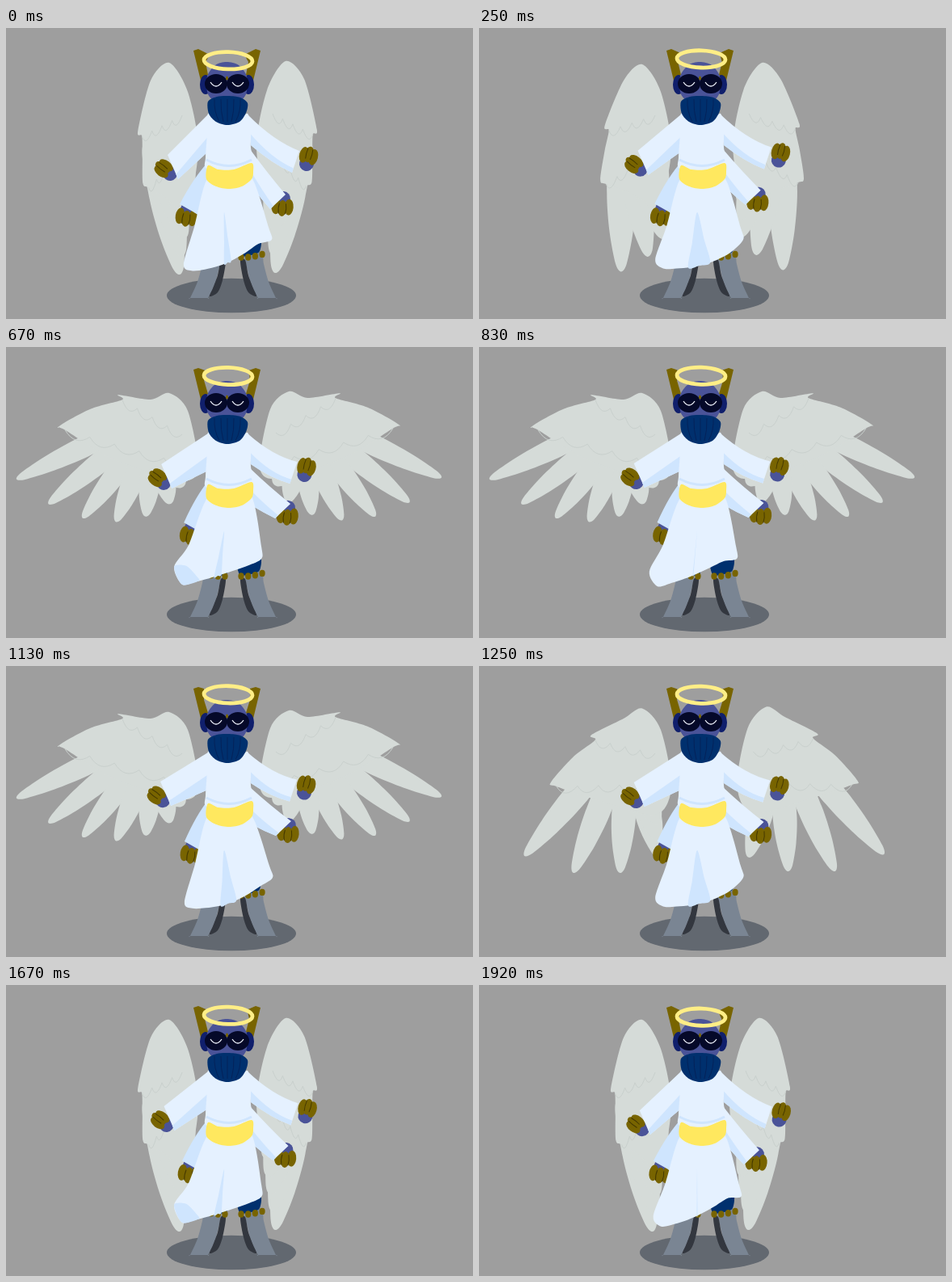
Recreate the animation shown at these times as an HTML page with a canvas. Size 578 by 360 pixels, loop 2 s.

```html
<!DOCTYPE html>
<html lang="en">
<head>
<meta charset="utf-8">
<title>Winged figure</title>
<style>
  html, body { margin: 0; width: 100%; height: 100%; overflow: hidden; background: #9e9e9e; }
  canvas { display: block; width: 578px; height: 360px; }
</style>
</head>
<body>
<canvas id="stage" width="578" height="360"></canvas>
<script>
const g = document.getElementById('stage').getContext('2d');
const LOOP = 2000;
const { sin, cos, PI, min, max, abs, floor } = Math;
const C = {
  back: '#9e9e9e', shadow: '#626870', wing: '#d5dbd8', wingLine: '#c9d0cd',
  robe: '#e5f1ff', fold: '#cfe5fe', belt: '#ffe85f', halo: '#ffee86',
  gold: '#786400', goldLine: '#453900', skin: '#4a5398', fur: '#00306e',
  furLine: '#04225a', cup: '#101f6c', lens: '#050929', leg: '#7a8593', hoof: '#33373f'
};

const pts = s => s.split(' ').map(p => p.split(',').map(Number));
const mix = (a, b, k) => a + (b - a) * k;
const between = (p, q, k, dy = 0) => [mix(p[0], q[0], k), mix(p[1], q[1], k) + dy];

// Closed smooth curve through the points.
function blob(p, fill) {
  const n = p.length, at = i => p[(i + n) % n];
  g.beginPath();
  g.moveTo(...p[0]);
  for (let i = 0; i < n; i++) {
    const [a, b, c, d] = [at(i - 1), at(i), at(i + 1), at(i + 2)];
    g.bezierCurveTo(b[0] + (c[0] - a[0]) / 7, b[1] + (c[1] - a[1]) / 7,
                    c[0] - (d[0] - b[0]) / 7, c[1] - (d[1] - b[1]) / 7, c[0], c[1]);
  }
  g.fillStyle = fill;
  g.fill();
}

function oval(x, y, rx, ry, fill) {
  g.beginPath();
  g.ellipse(x, y, rx, ry, 0, 0, 7);
  g.fillStyle = fill;
  g.fill();
}

function curve(a, control, b, color, width = 1) {
  g.beginPath();
  g.moveTo(...a);
  g.quadraticCurveTo(...control, ...b);
  g.strokeStyle = color;
  g.lineWidth = width;
  g.stroke();
}

function mirrored(cx, dy, draw) {
  g.save();
  g.translate(2 * cx, dy);
  g.scale(-1, 1);
  draw();
  g.restore();
}

// Wings: everything fans out around the shoulder joint, angles in degrees from straight down.
const spreads = [0, .15, .52, .68, 1];
const polar = (deg, r, dx = 0) =>
  [215 + dx - r * sin(deg * PI / 180), 90 + r * cos(deg * PI / 180)];

function feather(from, to, w) {
  const dx = to[0] - from[0], dy = to[1] - from[1], len = Math.hypot(dx, dy);
  const at = (k, side) => [from[0] + dx * k - dy / len * w * side, from[1] + dy * k + dx / len * w * side];
  blob([at(0, -.8), at(.4, -1), at(.7, -.8), at(.94, -.38), at(1, 0),
        at(.94, .38), at(.7, .8), at(.4, 1), at(0, .8)], C.wing);
}

function scallops(a, b, n) {
  for (let i = 0; i < n; i++)
    curve(between(a, b, i / n), between(a, b, (i + .4) / n, 17), between(a, b, (i + 1) / n), C.wingLine);
}

function wing(s) {
  const gap = 17 * sin(2.3 * s ** .8);
  for (let i = 0; i < 7; i++) {
    const deg = max(-3, 70 * s - gap * i), shift = 3 * i * (1 - s) ** 2;
    feather(polar(deg + mix(30, 14, s), 62, shift), polar(deg, 215 - 22 * i, shift), mix(19, 13, s));
  }
  const upper = polar(54 + 58 * s, 64 + 18 * s);
  const lower = polar(24 + 63 * s, 112 + 37 * s);
  const tuck = [upper[0] + 5, upper[1] + 6];
  const under = [lower[0] + 7, lower[1] + 5];
  blob([[238, 150], [225, 79], [202, 43 + 14 * s], [179, 65], upper, tuck,
        between(tuck, lower, .5, -5), lower, under,
        polar(9 + 50 * s, 120 - 25 * s), [223 - 8 * s, 225 - 60 * s]], C.wing);
  scallops(tuck, [218, 108], 4);
  scallops(under, [226, 146], 5);
}

// Skirt: a wave runs along the hem while the whole cloth sways.
function skirt(a) {
  const sway = cos(a - .6);
  const left = [214.5 + 6.5 * sway, 282 + 11 * cos(a - .4)];
  const right = [323 + 7 * sway, 262];
  const hem = u => [mix(left[0], right[0], u), 297 - 35 * u * u + (3 + 6 * u) * sin(a + 1.6 - 2.6 * u)];
  const edge = [.09, .24, .4, .55, .7, .85].map(hem);
  blob([[304, 185], [276, 180], [249, 187], [230 + 4 * sway, 245], left,
        ...edge, right, [321 + 5 * sway, 247]], C.robe);

  const w = .065 * (1 + sin(a - .4));
  blob([[270, 228], between([270, 228], hem(.5 + w), .55), hem(.5 + w), hem(.5),
        hem(.5 - w), between([270, 228], hem(.5 - w), .55)], C.fold);
  if (cos(a - .2) < -.5)
    blob([left, [left[0] + 15, left[1] - 1], [left[0] + 28, left[1] + 12], hem(.28), hem(.09)], C.fold);
}

// Sleeve: shoulder top and bottom, cuff top and bottom, and how far the cloth hangs.
function cloth(a, b, c, d, sag, fill) {
  g.beginPath();
  g.moveTo(...a);
  g.quadraticCurveTo(...between(a, b, .5, 2 * sag), ...b);
  g.lineTo(...c);
  g.quadraticCurveTo(...between(c, d, .5, sag), ...d);
  g.fillStyle = fill;
  g.fill();
}

function hand(x, y, deg, spread) {
  g.save();
  g.translate(x, y);
  g.rotate(deg * PI / 180);
  oval(0, 0, 9, 9, C.skin);
  for (const i of [-1, 1, 0]) oval(12 - abs(i) * 2, i * spread, 10, 5.6, C.gold);
  for (const i of [-1, 1]) curve([6, i * spread / 2], [12, i * spread * .7], [19, i * spread / 2], C.goldLine);
  g.restore();
}

const arms = {
  lowLeft: { sleeve: '251,165 215,218 238,231 254,190', sag: -4, move: [6, -1], wrist: [225, 224], aim: 100, spread: 8 },
  lowRight: { sleeve: '302,150 346,206 327,224 304,196', sag: 1, move: [7, -14], wrist: [343, 211], aim: 95, spread: 8 },
  left: { sleeve: '250,107 200,157 213,187 250,153', sag: 0, move: [-9, -14], wrist: [203, 180], aim: -142, spread: 5 },
  right: { sleeve: '299,107 363,152 354,179 303,145', sag: 5, move: [-3, -11.5], wrist: [372, 168], aim: -75, spread: 6 }
};

function drawArm({ sleeve, sag, move, wrist, aim, spread }, swing, fill = C.robe) {
  const shift = ([x, y]) => [x + move[0] * swing, y + move[1] * swing];
  const [a, b, c, d] = pts(sleeve);
  const top = shift(b), low = shift(c);
  hand(...shift(wrist), aim, spread);
  cloth(a, top, low, d, sag, fill);
  cloth(between(a, d, .6), between(top, low, .8), low, d, sag, C.fold);
}

const legShape = pts('296,278 316,278 319,292 325,314 334,334 334,334 312,334 312,334 304,318 299,300');
const hoofShape = pts('290,288 296,287 300,306 306,322 310,332 300,327 294,312');

function leg() {
  blob(legShape, C.leg);
  blob(hoofShape, C.hoof);
  blob(pts('287,258 314,258 314,276 303,281 289,281'), C.fur);
  for (let i = 0; i < 4; i++) oval(291 + 8.7 * i, 283.5 - .6 * i * (i - 1), 3.6, 4.2, C.gold);
}

function side(swing) {
  g.beginPath();
  [[232, 28], [238, 26], [252 - 7 * swing, 33 - 5 * swing], [247 - 2 * swing, 42], [250, 58], [241, 65]]
    .forEach(p => g.lineTo(...p));
  g.fillStyle = C.gold;
  g.fill();
  oval(247, 70, 7, 12, C.cup);
}

function head(swing) {
  side(swing);
  mirrored(273.5, 0, () => side(swing));
  blob(pts('273,42 288,46 298,60 297,82 284,94 264,94 250,82 249,60 259,46'), C.skin);
  for (const x of [260, 287]) {
    oval(x, 69, 14, 12, C.lens);
    curve([x - 7, 67], [x, 77], [x + 7, 67], '#f4f7ff', 1.3);
  }
  oval(273.5, 62, 1.5, 2.5, C.gold);
  blob(pts('250,91 261,85 275,84 290,86 299,93 297,105 289,116 274,120 260,116 251,106'), C.fur);
  for (let i = -2; i <= 2; i++)
    curve([274 + i * 8, 88], [274 + i * 8.5, 103], [274 + i * 5, 116], C.furLine);
}

function halo(swing) {
  g.beginPath();
  g.ellipse(275, 40.3 - 5 * swing, 30, 10.6, .03, 0, 7);
  g.strokeStyle = C.halo;
  g.lineWidth = 4.8;
  g.stroke();
}

function draw(time) {
  const t = time % LOOP;
  // Cloth and wings move in sixteen steps per loop, limbs and halo in twenty-four.
  const step = floor(t / LOOP * 16);
  const swing = sin(PI * floor(t / LOOP * 24) / 24);
  const s = spreads[max(0, min(4, 6 - abs(step - 7)))];

  g.fillStyle = C.back;
  g.fillRect(0, 0, 578, 360);
  oval(279, 331, 80, 21.3, C.shadow);

  wing(s);
  mirrored(274 + 2 * s + 4 * sin(PI * s), -2, () => wing(s));

  leg();
  mirrored(281, 0, leg);
  drawArm(arms.lowLeft, swing, C.fold);
  drawArm(arms.lowRight, swing);
  skirt(step * PI / 4);
  drawArm(arms.left, swing);
  drawArm(arms.right, swing);
  blob(pts('250,106 262,112 288,112 299,106 303,125 303,148 306,172 276,182 248,174 247,160 249,130'), C.robe);
  curve([248, 163], [276, 178], [304, 163], C.fold, 3);
  blob(pts('250,170 263,175 282,175 304,167 306,178 304,187 292,196 276,199 260,196 248,187'), C.belt);
  head(swing);
  halo(swing);
}

function tick() {
  draw(performance.now());
  requestAnimationFrame(tick);
}
tick();
</script>
</body>
</html>
```
